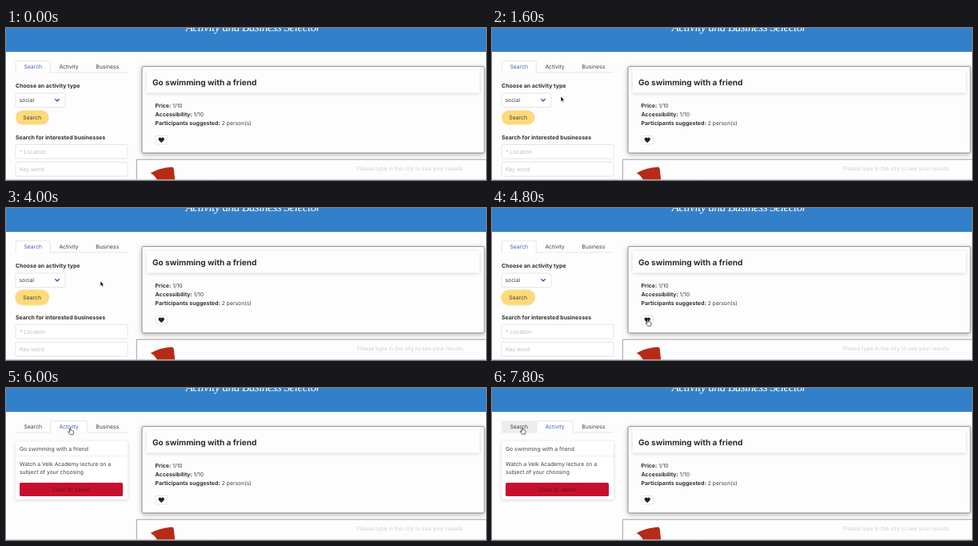
Recreate the animation shown at these times as an HTML page. Size 600 px wide and 191 px high, loop 8000 ms.

```html
<!DOCTYPE html>
<html lang="en">
<head>
<meta charset="utf-8">
<title>Activity selector</title>
<style>
  html, body { margin: 0; width: 100%; height: 100%; overflow: hidden; background: #fdfdfd; }
  svg { display: block; width: 600px; height: 191px; }
  text { font: 6.83px Inter, "Open Sans", sans-serif; fill: #404040; text-rendering: geometricPrecision; white-space: pre; }
  .b { font-weight: 700; font-size: 6.97px; fill: #303030; }
  .title { font-weight: 700; font-size: 10.05px; fill: #2c2c2c; }
  .head { font: italic 15px "Liberation Serif", "Noto Serif", serif; letter-spacing: -.43px; fill: #fff; }
  .hint { fill: #bdbdbd; }
  .pale { fill: #cfcfcf; }
  .mid { text-anchor: middle; }
  .field { fill: #fff; stroke: #dbdbdb; stroke-width: .7; }
  .line { fill: none; stroke: #dbdbdb; stroke-width: .7; }
  .active text { fill: #4259c3; }
  .tab .edge { visibility: hidden; }
  .tab.active .edge { visibility: visible; }
  .tab .bg { fill: none; }
  .tab.hover .bg { fill: #ededed; }
  .tab.active .bg { fill: #fff; }
  .soft { filter: drop-shadow(0 1px 2px rgba(10, 10, 10, .16)); }
  .deep { filter: drop-shadow(0 2px 3px rgba(10, 10, 10, .28)); }
  .off { visibility: hidden; }
</style>
</head>
<body>
<svg viewBox="0 0 600 191">
  <defs>
    <path id="arrow" d="M0 0V6.3L1.5 5 2.5 7.2 3.6 6.7 2.6 4.6H4.6Z" fill="#111" stroke="#fff" stroke-width=".5"/>
    <path id="hand" d="M0 .7Q.7-.3 1.4.7V3Q2.2 2.5 2.7 3.2 3.4 2.8 3.9 3.5 4.8 3.2 5 4.2V6L4.3 8.3H.6L-1.7 5.2Q-1.9 4.2-.9 4.4L0 5.2Z" fill="#fff" stroke="#222" stroke-width=".7"/>
    <path id="beam" d="M-1.4-3.5Q0-3.5 0-2.7 0-3.5 1.4-3.5M0-2.7V2.7M-1.4 3.5Q0 3.5 0 2.7 0 3.5 1.4 3.5M-.8 1H.8" fill="none" stroke="#222" stroke-width=".7"/>
  </defs>

  <rect width="600" height="191" fill="#fdfdfd"/>
  <rect width="600" height="30" fill="#3380ca"/>
  <text class="head mid" x="309" y="4.3">Activity and Business Selector</text>

  <path class="line" d="M12 55.8H152"/>
  <g id="tabs"></g>

  <g id="search">
    <text class="b" x="12" y="75">Choose an activity type</text>
    <rect class="field" x="12" y="82" width="62" height="17.6" rx="1.8"/>
    <text x="16.5" y="93.2">social</text>
    <path d="M61.3 89.2 64 91.8 66.7 89.2" fill="none" stroke="#3d50b5" stroke-width="1.3"/>
    <rect id="ring" x="10.9" y="102.3" width="43.7" height="20.4" rx="10.2" fill="#fbe7ae"/>
    <rect x="12" y="103.4" width="41.5" height="18.2" rx="9.1" fill="#fdd978"/>
    <text class="mid" x="32.7" y="115">Search</text>
    <text class="b" x="12" y="140">Search for interested businesses</text>
    <rect class="field" x="12" y="146.5" width="140" height="17.6" rx="1.8"/>
    <text class="hint" x="17" y="158">* Location</text>
    <rect class="field" x="12" y="168.5" width="140" height="17.6" rx="1.8"/>
    <text class="hint" x="17" y="180">Key word</text>
  </g>

  <g id="saved">
    <rect class="soft" x="12" y="67" width="140" height="73" rx="1.8" fill="#fff"/>
    <path class="line" d="M12 85.5H152" opacity=".6"/>
    <text x="17" y="79">Go swimming with a friend</text>
    <text x="17" y="97.5">Watch a Velk Academy lecture on a</text>
    <text x="17" y="108.2">subject of your choosing</text>
    <rect x="17" y="119" width="129" height="17" rx="1.8" fill="#c80f2f"/>
    <text class="mid" x="81.5" y="130" style="fill:#68131f">Clear all saved</text>
  </g>

  <rect class="deep" x="170" y="48.3" width="428" height="108.7" rx="1.6" fill="#fdfdfd" stroke="#858585" stroke-width=".9"/>
  <rect class="soft" x="175.7" y="53.5" width="416.3" height="28" fill="#fdfdfd"/>
  <text class="title" x="183" y="71.6">Go swimming with a friend</text>
  <g id="facts"></g>
  <rect id="like" class="field" x="187" y="135.4" width="14.6" height="10.6" rx="1.2"/>
  <path d="M194.2 144.3 190.9 140.9Q189.9 139 191.3 137.9 193 137 194.2 138.6 195.4 137 197.1 137.9 198.5 139 197.5 140.9Z" fill="#222"/>

  <path d="M163.3 192V165.2H601V192" fill="#fdfdfd" stroke="#979797" stroke-width=".9"/>
  <path d="M180.7 182.2Q192 175.8 207.5 174.8 209.5 175 209.8 177.5L211.2 191H189Q186.5 185.5 180.7 182.2Z" fill="#b82a18"/>
  <text class="pale" x="438.7" y="179">Please type in the city to see your results</text>
  <path d="M0 190.6H600" stroke="#c2c2c2" stroke-width=".8"/>

  <use id="cursor"/>
</svg>
<script>
const $ = id => document.getElementById(id);
const LOOP = 8000;

// time, x, y, pointer shape
const moves = [
  [0, 0, 0, ''],
  [800, 364, 183, 'arrow'], [1000, 262, 148, 'arrow'], [1200, 158, 112, 'arrow'],
  [1400, 104, 93, 'arrow'], [1600, 86, 86, 'arrow'],
  [2000, 66, 90, 'hand'], [2200, 37, 92, 'hand'], [2400, 92, 62, 'arrow'],
  [2600, 163, 66, 'arrow'], [2800, 142, 79, 'arrow'], [3000, 124, 92, 'arrow'],
  [3200, 74, 105, 'arrow'], [3400, 38, 111, 'hand'], [3800, 82, 101, 'arrow'],
  [4000, 118, 92, 'arrow'], [4200, 126, 104, 'arrow'],
  [4400, 152, 119, 'arrow'], [4600, 180, 134, 'arrow'], [4800, 194, 140, 'hand'],
  [5400, 172, 116, 'arrow'], [5600, 110, 72, 'arrow'], [5800, 79.5, 50.3, 'hand'],
  [6200, 80, 70, 'arrow'], [6400, 81, 86, 'beam'], [6600, 81, 96, 'beam'],
  [6800, 84, 111, 'arrow'], [7000, 78, 121, 'hand'], [7200, 62, 103, 'beam'],
  [7400, 45, 74, 'beam'], [7600, 37.5, 51, 'hand'], [7800, 37, 49.8, 'hand']
];

const tabs = [['Search', 12, 55.5], ['Activity', 55.5, 101.5], ['Business', 101.5, 152]];
$('tabs').innerHTML = tabs.map(([name, l, r]) => `<g class="tab">
  <rect class="bg" x="${l}" y="41.3" width="${r - l}" height="14.9"/>
  <path class="edge line" d="M${l + .3} 56V43Q${l + .3} 41.3 ${l + 2} 41.3H${r - 2}Q${r - .3} 41.3 ${r - .3} 43V56"/>
  <text class="mid" x="${(l + r) / 2}" y="51.2">${name}</text></g>`).join('');
const tabNodes = [...document.querySelectorAll('.tab')];

const facts = [['Price:', '1/10'], ['Accessibility:', '1/10'], ['Participants suggested:', '2 person(s)']];
$('facts').innerHTML = facts.map(([key, value], i) =>
  `<text x="186.5" y="${100 + i * 10.75}"><tspan class="b">${key}</tspan> ${value}</text>`).join('');

const show = (id, on) => $(id).classList.toggle('off', !on);

function draw(t) {
  const [, x, y, shape] = moves.findLast(m => m[0] <= t);
  const saved = t >= 6000;
  show('search', !saved);
  show('saved', saved);
  show('ring', !saved && t >= 3600 && t < 5000);
  $('like').style.stroke = t >= 5000 && !saved ? '#5a6fd0' : '';

  tabNodes.forEach((node, i) => {
    const [, left, right] = tabs[i];
    node.classList.toggle('active', i === (saved ? 1 : 0));
    node.classList.toggle('hover', shape === 'hand' && y > 41 && y < 56 && x > left && x < right);
  });

  show('cursor', shape);
  $('cursor').setAttribute('href', '#' + (shape || 'arrow'));
  $('cursor').setAttribute('transform', `translate(${x} ${y})`);
}

const start = performance.now();
function tick() {
  draw((performance.now() - start) % LOOP);
  requestAnimationFrame(tick);
}
tick();
</script>
</body>
</html>
```
